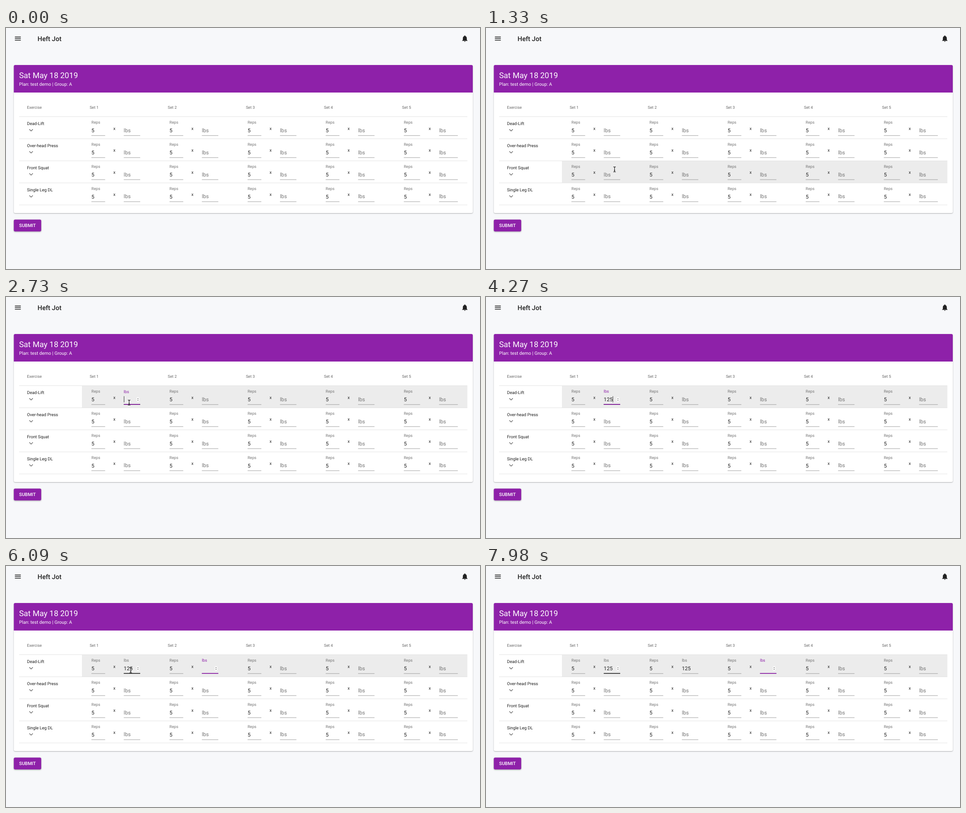
Recreate the animation shown at these times as an HTML page. Size 1049 by 534 pixels, loop 8 s.

```html
<!DOCTYPE html>
<html lang="en">
<head>
<meta charset="utf-8">
<title>Workout log</title>
<style>
  html, body { margin: 0; width: 100%; height: 100%; overflow: hidden; background: #f7f8fa; }
  svg { display: block; width: 1049px; height: 534px; font-family: Roboto, Arial, sans-serif; }
  text { fill: #212121; font-size: 9.46px; text-rendering: geometricPrecision; white-space: pre; }
  .brand { font-size: 14.56px; font-weight: 500; }
  .date { font-size: 17.47px; fill: #fff; }
  .plan { font-size: 10.19px; fill: #fff; }
  .button { font-size: 10.19px; font-weight: 500; fill: #fff; }
  .small { font-size: 8.74px; fill: #757575; }
  .head { font-size: 8.74px; fill: #666; }
  .value { font-size: 11.64px; }
  .icon { fill: #212121; }
  .chevron { fill: #6f6f6f; }
  .rule { fill: #e0e0e0; }
  .line { fill: #949494; }
  .card { fill: #fff; filter: drop-shadow(0 1px 1px rgba(0, 0, 0, .3)); }
  .submit { fill: #8e21a9; filter: drop-shadow(0 1px 1.5px rgba(0, 0, 0, .35)); }
</style>
</head>
<body>
<svg id="stage" viewBox="0 0 1049 534">
  <path class="icon" transform="translate(17.5 14.6) scale(.728)" d="M3 18h18v-2H3zm0-5h18v-2H3zm0-7v2h18V6z"/>
  <text class="brand" x="69.8" y="28.6">Heft Jot</text>
  <path class="icon" transform="translate(1006.7 14.6) scale(.728)" d="M12 22c1.1 0 2-.9 2-2h-4c0 1.1.89 2 2 2zm6-6v-5c0-3.07-1.64-5.64-4.5-6.32V4c0-.83-.67-1.5-1.5-1.5s-1.5.67-1.5 1.5v.68C7.63 5.36 6 7.92 6 11v5l-2 2v1h16v-1z"/>
  <rect class="card" x="17.3" y="82" width="1015.7" height="328" rx="3"/>
  <path fill="#8e21a9" d="M17.3 143V85a3 3 0 0 1 3-3h1009.7a3 3 0 0 1 3 3v58z"/>
  <text class="date" x="29" y="111">Sat May 18 2019</text>
  <text class="plan" x="29" y="127.9">Plan: test demo | Group: A</text>
  <rect class="submit" x="17.3" y="424.6" width="60.6" height="26.2" rx="3"/>
  <text class="button" x="29" y="441.4">SUBMIT</text>
  <rect id="hover" x="168" width="853" height="48.2" fill="#ececec"/>
  <g id="table"></g>
  <g id="fields"></g>
  <g id="pointer">
    <path id="arrow" fill="#111" stroke="#fff" stroke-width=".8" d="M0 0v10.6l2.5-2.3 1.7 3.9 1.8-.8-1.7-3.8h3.4z"/>
    <g id="beam" fill="none">
      <path stroke="#fff" stroke-opacity=".6" stroke-width="2.2" d="M0-5V5"/>
      <path stroke="#111" stroke-width="1.1" d="M-2.6-5.6Q0-5.6 0-4.2Q0-5.6 2.6-5.6M0-4.6V4.6M-2.6 5.6Q0 5.6 0 4.2Q0 5.6 2.6 5.6M-1.4 2.2H1.4"/>
    </g>
  </g>
</svg>
<script>
const LOOP = 8000, STEP = 70, TOP = 196.6, ROW = 48.87, COL = 172.85;
const PURPLE = [142, 33, 169], GREY = [117, 117, 117];
const exercises = ['Dead-Lift', 'Over-head Press', 'Front Squat', 'Single Leg DL'];

// Times at which each weight field gets focus and its digits are typed.
const entries = [
  { focus: 2590, blur: 5300, keys: [3150, 3500, 3850] },
  { focus: 5300, blur: 7350, keys: [6370, 6650, 6900] },
  { focus: 7350, blur: 9999, keys: [] }
];
// Pointer stops: time, x, y.
const path = [
  [700, 345, 545], [910, 318, 470], [1120, 292, 359], [1400, 282, 298],
  [1680, 272.5, 244], [1960, 272.5, 236], [2590, 272.5, 234],
  [5880, 272.5, 234], [6090, 276, 231]
];
const visible = [[750, 3150], [5950, 6370]];

const $ = id => document.getElementById(id);
const mix = (a, b, p) => a + (b - a) * p;
const clamp = v => Math.max(0, Math.min(1, v));
const ease = u => 1 - (1 - clamp(u)) ** 3;
const rgb = (a, b, p) => `rgb(${a.map((v, i) => Math.round(mix(v, b[i], p)))})`;
const rect = (cls, x, y, w, h) => `<rect class="${cls}" x="${x}" y="${y}" width="${w}" height="${h}"/>`;
const text = (cls, x, y, s) => `<text class="${cls}" x="${x}" y="${y}">${s}</text>`;
const lbsX = col => col === 4 ? 958.4 : 260.6 + COL * col;

function drawTable() {
  let out = text('head', 46.5, 178.9, 'Exercise');
  for (let c = 0; c < 5; c++) out += text('head', 185.2 + COL * c, 178.9, 'Set ' + (c + 1));
  for (let r = 0; r <= 4; r++) out += rect('rule', 29, TOP + ROW * r - .5, 992, .9);
  exercises.forEach((name, r) => {
    const y = TOP + ROW * r;
    out += text('', 46.5, y + 18.7, name);
    out += `<path class="chevron" transform="translate(46.8 ${y + 21}) scale(.728)" d="M16.59 8.59L12 13.17 7.41 8.59 6 10l6 6 6-6z"/>`;
    for (let c = 0; c < 5; c++) {
      const x = 189 + COL * c, last = c === 4;
      out += text('small', x, y + 15.5, 'Reps');
      out += text('value', x, y + 34.3, 5);
      out += rect('line', x, y + 41.2, last ? 36 : 30.4, .9);
      out += text('', last ? 935.4 : 237.5 + COL * c, y + 29, 'x');
      out += rect('line', lbsX(c), y + 41.2, last ? 41.5 : 36.4, .9);
      if (r || c > 2) out += `<text class="value" style="fill:#757575" x="${lbsX(c)}" y="${y + 34.2}">lbs</text>`;
    }
  });
  $('table').innerHTML = out;
}

function pointerAt(t) {
  if (t < path[0][0]) return null;
  const i = path.findIndex(p => p[0] > t);
  if (i < 0) return path[path.length - 1].slice(1);
  const [a, b] = [path[i - 1], path[i]];
  const p = (t - a[0]) / (b[0] - a[0]);
  return [mix(a[1], b[1], p), mix(a[2], b[2], p)];
}

function spinner(x, y) {
  return `<rect x="${x + 28.6}" y="${y + 25.2}" width="5.6" height="10.4" rx="2" fill="#fafafa"/>` +
    `<path fill="#555" d="M${x + 30} ${y + 29.2}h2.8l-1.4-1.9zM${x + 30} ${y + 31.6}h2.8l-1.4 1.9z"/>`;
}

function field(e, col, t) {
  const x = lbsX(col), y = TOP;
  const on = ease((t - e.focus) / 200), off = ease((t - e.blur) / 200);
  const typed = e.keys.filter(k => k <= t);
  const focused = t >= e.focus && t < e.blur;
  const active = on * (1 - off);
  let out = `<text x="${x}" y="${y + mix(34.2, 15.5, on)}" style="font-size:${mix(11.64, 8.74, on)}px;fill:${rgb(GREY, PURPLE, active)}">lbs</text>`;
  out += text('value', x, y + 34.3, '125'.slice(0, typed.length));
  if (focused) out += spinner(x, y);
  if (active > 0) {
    const w = 36.4 * (focused ? on : 1), left = x + (36.4 - w) / 2;
    out += `<rect x="${left}" y="${y + 40.5}" width="${w}" height="1.7" fill="rgb(${PURPLE})" opacity="${1 - off}"/>`;
  }
  const last = Math.max(e.focus, ...typed);
  if (focused && (t - last) % 1000 < 500)
    out += `<rect x="${x + typed.length * 6.54 + .2}" y="${y + 23.2}" width=".9" height="13.6" fill="#222"/>`;
  return out;
}

function render(t) {
  const pos = pointerAt(t);
  let out = '', row = -1, beam = false;
  if (pos) {
    const [x, y] = pos;
    row = Math.floor((y + 2 - TOP) / ROW);
    const dy = y - TOP - row * ROW;
    const inField = row >= 0 && row < 4 && x > 260 && x < 297;
    beam = inField && dy > 12 && dy < 42;
    if (beam && dy > 20) {
      const top = TOP + row * ROW;
      out += `<rect x="260.6" y="${top + 40.6}" width="36.4" height="1.5" fill="#212121"/>` + spinner(260.6, top);
    }
    $('pointer').setAttribute('transform', `translate(${x} ${y})`);
  }
  const shown = pos && visible.some(([a, b]) => t >= a && t < b);
  $('pointer').style.display = shown ? '' : 'none';
  $('arrow').style.display = beam ? 'none' : '';
  $('beam').style.display = beam ? '' : 'none';
  $('hover').style.display = row >= 0 && row < 4 ? '' : 'none';
  $('hover').setAttribute('y', TOP + Math.max(row, 0) * ROW + .4);
  $('fields').innerHTML = out + entries.map((e, i) => field(e, i, t)).join('');
}

function tick(now) {
  render(Math.floor(now % LOOP / STEP) * STEP);
  requestAnimationFrame(tick);
}

drawTable();
render(0);
requestAnimationFrame(tick);
</script>
</body>
</html>
```
